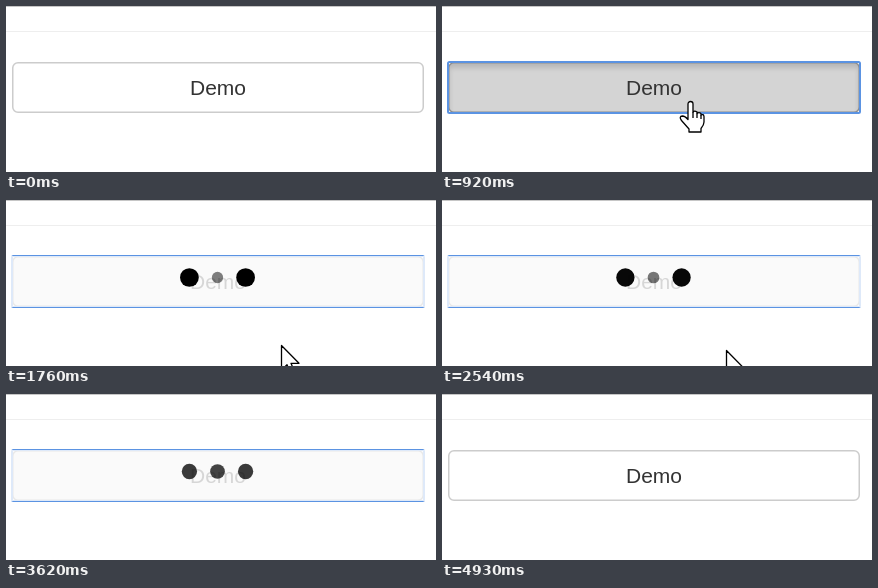
These frames come from a looping animation (430x166 px, 5010 ms). An HTML page:

```html
<!DOCTYPE html>
<html lang="en">
<head>
<meta charset="utf-8">
<title>Button loading overlay</title>
<style>
  html, body { margin: 0; width: 100%; height: 100%; overflow: hidden; background: #fff; }
  svg { display: block; }
  text { font: 21px "Liberation Sans", Arial, sans-serif; fill: #333; }
  .cursor { fill: #fff; stroke: #000; stroke-width: 1.3; stroke-linejoin: round; }
</style>
</head>
<body>
<svg width="430" height="166" viewBox="0 0 430 166">
  <defs>
    <filter id="soft" x="-5%" y="-20%" width="110%" height="140%"><feGaussianBlur stdDeviation="2.6"/></filter>
    <clipPath id="inside"><rect x="7.5" y="57.5" width="409" height="48" rx="4.5"/></clipPath>
  </defs>
  <rect width="430" height="1" fill="#c6c6c6"/>
  <rect y="25" width="430" height="1" fill="#eee"/>

  <rect id="face" x="6.75" y="56.75" width="410.5" height="49.5" rx="5.25" stroke-width="1.5"/>
  <g id="pressed" clip-path="url(#inside)">
    <path d="M-10 40H440V125H-10ZM7.5 62H416.5V110H7.5Z" fill-rule="evenodd" opacity=".13" filter="url(#soft)"/>
  </g>
  <rect id="ring" x="6" y="56" width="412" height="51" rx="1.5" fill="none" stroke="#5b93e2" stroke-width="2"/>
  <text x="184" y="89">Demo</text>

  <g id="overlay">
    <rect x="5" y="56" width="414" height="51" fill="#fff" fill-opacity=".8"/>
    <circle class="dot" cx="183.4" cy="77.5"/>
    <circle class="dot" cx="211.5" cy="77.5"/>
    <circle class="dot" cx="239.6" cy="77.5"/>
  </g>

  <path id="arrow" class="cursor" d="M.5 .5V25L6 19.8L9.8 28.4L13.6 26.8L10 18.3H18Z"/>
  <g id="hand" class="cursor">
    <path d="M-3 18V3A2.4 2.4 0 0 1 2 3V11Q3.5 9.2 6 11V12.5Q8 10.6 10 12.6V14Q12.6 12.6 13 15.5V21Q13 24 10 27.5V31H-2V28L-9.5 19.5Q-12.5 15.5 -8.5 15Q-6 15 -3 18.5Z"/>
    <path d="M2 11V17M6 12.5V17M10 14V18" fill="none"/>
  </g>
</svg>
<script>
  const LOOP = 5010, TICK = 77.6, TICK_ORIGIN = 1449;
  const PULSE = 800, PULSE_PEAK = 159;
  const $ = id => document.getElementById(id);
  const dots = document.querySelectorAll('.dot');

  // start time, cursor, x, y: each pose holds until the next one
  const poses = [
    [0, ''],
    [70, 'arrow', 284, 114],
    [140, 'hand', 272, 105],
    [220, 'hand', 262, 100],
    [290, 'hand', 257, 98],
    [440, 'hand', 252, 96],
    [520, 'hand', 249, 95],
    [1130, 'hand', 252, 101],
    [1210, 'arrow', 263, 121],
    [1290, 'arrow', 272, 138],
    [1365, 'arrow', 275, 145],
    [2455, 'arrow', 277, 147],
    [2535, 'arrow', 284, 150],
    [2612, 'arrow', 283, 158],
    [2690, '']
  ];

  const set = (el, attrs) => {
    for (const name in attrs) el.setAttribute(name, attrs[name]);
  };
  const show = (el, on) => el.style.display = on ? '' : 'none';

  function swing(t, start, duration) {
    const p = Math.min(1, Math.max(0, (t - start) / duration));
    return 0.5 - Math.cos(p * Math.PI) / 2;
  }

  function drawButton(t) {
    const focused = t >= 920 && t < 4930;
    const down = t >= 920 && t < 980;
    const hovered = t >= 140 && t < 920;
    set($('face'), {
      fill: down ? '#d4d4d4' : focused || hovered ? '#e6e6e6' : '#fff',
      stroke: focused ? '#8c8c8c' : hovered ? '#adadad' : '#ccc'
    });
    show($('pressed'), down);
    show($('ring'), focused);
  }

  function drawOverlay(t) {
    // The loader advances in coarse ticks
    const now = TICK_ORIGIN + TICK * Math.floor((t - TICK_ORIGIN) / TICK);
    const opacity = swing(now, 960, 400) - swing(now, 3590, 400);
    set($('overlay'), { opacity });
    const phase = ((now - PULSE_PEAK + 2 * PULSE) % PULSE) / PULSE;
    const outer = Math.abs(1 - 2 * phase);
    dots.forEach((dot, i) => {
      const size = i === 1 ? 1 - outer : outer;
      set(dot, { r: 5.625 + 3.75 * size, 'fill-opacity': 0.5 + 0.5 * size });
    });
  }

  function drawCursor(t) {
    const [, kind, x, y] = poses.filter(pose => pose[0] <= t).pop();
    for (const id of ['arrow', 'hand']) show($(id), id === kind);
    if (kind) set($(kind), { transform: `translate(${x} ${y})` });
  }

  const begin = performance.now();
  function draw() {
    const t = Math.max(0, performance.now() - begin) % LOOP;
    drawButton(t);
    drawOverlay(t);
    drawCursor(t);
    requestAnimationFrame(draw);
  }
  draw();
</script>
</body>
</html>
```
